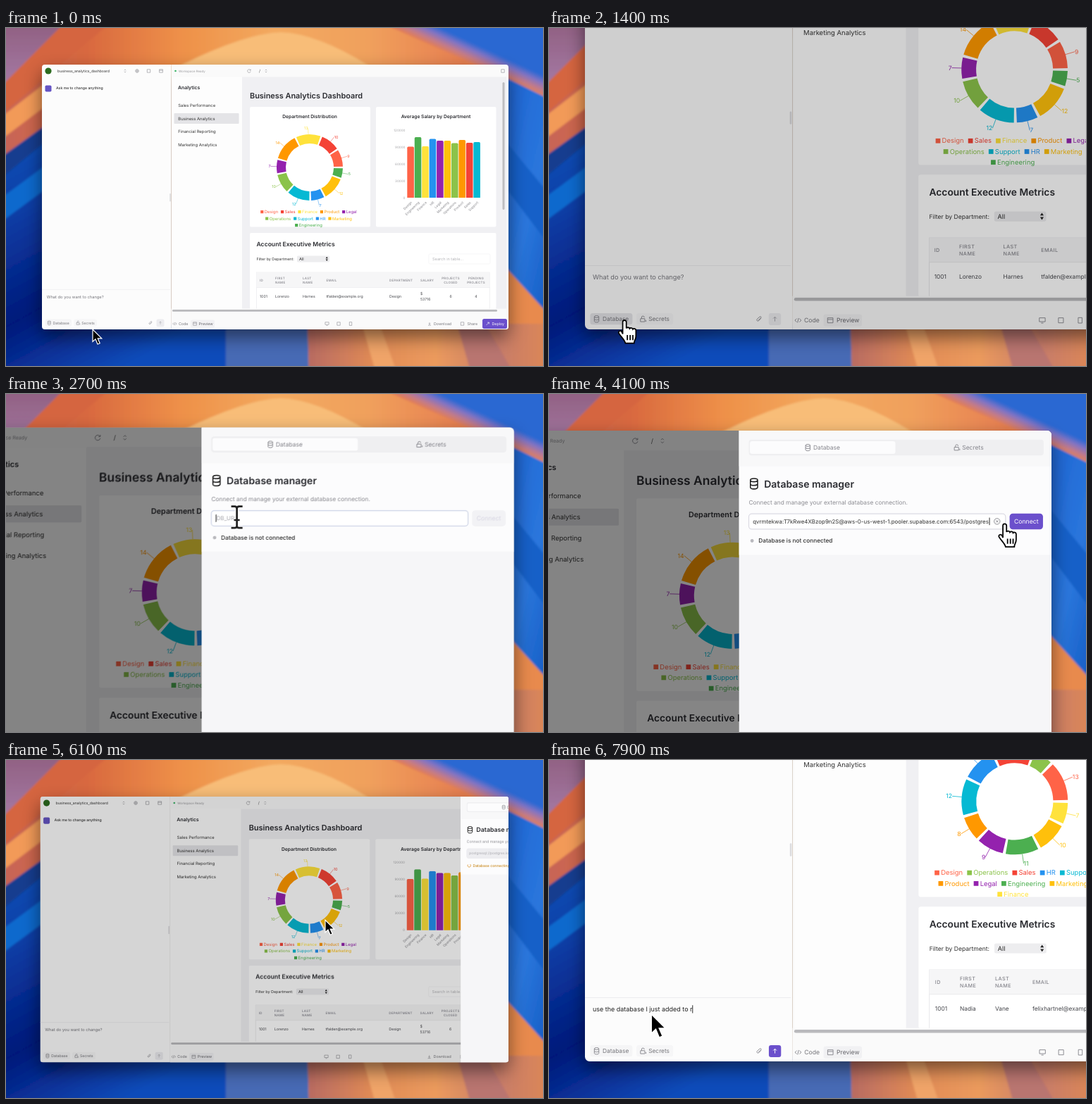
An HTML page for the animation above (8 s loop, 762 by 480 pixels).

```html
<!DOCTYPE html>
<html lang="en">
<head>
<meta charset="utf-8">
<title>Database setup</title>
<style>
html, body { margin: 0; width: 100%; height: 100%; overflow: hidden; }
svg { display: block; width: 762px; height: 480px; font-family: Inter, Roboto, sans-serif; text-rendering: geometricPrecision; }
.icon { fill: none; stroke: #8a8a90; stroke-width: .6; }
</style>
</head>
<body>
<svg id="stage" viewBox="0 0 762 480"></svg>
<script>
const LOOP = 8000, WIN = { x: 51, y: 52, w: 662, h: 376 };
const PURPLE = '#6b50cc', GREY = '#85858c', INK = '#2b2c31';
const color = {
  Design: '#ff6347', Sales: '#f44336', Finance: '#ffe23b', Product: '#ff9800', Legal: '#9422ae',
  Operations: '#8bc34a', Support: '#06b9d3', HR: '#2492f0', Marketing: '#ffc00b', Engineering: '#4caf50'
};

const rect = (x, y, w, h, fill, more = '') => `<rect x="${x}" y="${y}" width="${w}" height="${h}" fill="${fill}" ${more}/>`;
const text = (x, y, s, size, fill = INK, more = '') =>
  `<text x="${x}" y="${y + size * .36}" font-size="${size}" fill="${fill}" ${more}>${s}</text>`;
const poly = (points, fill) => `<polygon points="${points}" fill="${fill}"/>`;
const icon = (x, y, d, more = '', scale = 1) =>
  `<path class="icon" transform="translate(${x} ${y}) scale(${scale})" d="${d}" ${more}/>`;
const gradient = (id, dir, ...stops) => `<linearGradient id="${id}" ${dir}>${stops.map((c, i) =>
  `<stop offset="${i / (stops.length - 1)}" stop-color="${c}"/>`).join('')}</linearGradient>`;
const BOLD = 'font-weight="600"', MID = 'text-anchor="middle"', END = 'text-anchor="end"';
const DOWN = 'x1="0" y1="0" x2="0" y2="1"';

const shape = {
  db: 'M-2-2a2 .9 0 0 0 4 0a2 .9 0 0 0-4 0V2a2 .9 0 0 0 4 0V-2M-2 0a2 .9 0 0 0 4 0',
  key: 'M-2.2-.3H1.6V2.4H-2.2ZM-1.2-.3V-1.4a1.2 1.2 0 0 1 2.4 0M2.6 1V2.4',
  square: 'M-2.2-2.2H2.2V2.2H-2.2Z',
  page: 'M-1.7-2.4H1.7V2.4H-1.7Z',
  browser: 'M-2.4-2.2H2.4V2.2H-2.4ZM-2.4-.8H2.4',
  screen: 'M-2.6-2.2H2.6V1.2H-2.6ZM-1 2.4H1',
  code: 'M-1.2-1.5L-2.8 0L-1.2 1.5M1.2-1.5L2.8 0L1.2 1.5M.4-2L-.4 2',
  sort: 'M-1.2-.8L0-2L1.2-.8M-1.2.8L0 2L1.2.8',
  globe: 'M-2.3 0a2.3 2.3 0 0 0 4.6 0a2.3 2.3 0 0 0-4.6 0H2.3M0-2.3V2.3',
  reload: 'M2 -1a2.3 2.3 0 1 0 .2 1.6M2.2-2.4V-.9H.7',
  clip: 'M1.8-.6L-.4 1.6a1 1 0 0 1-1.4-1.4L.6-2a.7.7 0 0 1 1 1L-.6 1.2',
  up: 'M0 2V-2M-1.5-.5L0-2L1.5-.5',
  down: 'M0-2V1M-1.2-.2L0 1L1.2-.2M-2 2.2H2',
  arrow: 'M0 0V17.5L4 13.8L7 21L10.2 19.7L7.2 12.8H12.8Z',
  hand: 'M-1.6 12V1.5a1.6 1.6 0 0 1 3.2 0V7c.3-1 2.7-1 3 .3 .6-.9 2.6-.7 2.8.5 .7-.8 2.7-.5 2.7 1V14c0 3-1.6 3.6-1.6 6.2H.8C0 17-3.2 14.5-5 11.5c-1-1.7 1.6-3 2.5-1.5z',
  beam: 'M-5-9.5H-2Q0-9.5 0-7.5Q0-9.5 2-9.5H5M0-7.5V7.5M-5 9.5H-2Q0 9.5 0 7.5Q0 9.5 2 9.5H5M-2.5 2.5H2.5'
};

const wallpaper = `
  ${gradient('sky', 'x1="0" x2="1"', '#c4645a', '#d8683f', '#ee9048', '#f3a95f', '#f0a05c', '#e67f50', '#e98a4e')}
  ${gradient('mauve', DOWN, '#8f5f80', '#a67aa6')}
  ${gradient('navy', 'x1="0" y1="0" x2=".5" y2="1"', '#0b55bd', '#0a3ca4', '#02197a', '#0e4cba')}
  ${gradient('azure', 'x1="0" y1="0" x2="1" y2="1"', '#1d62d2', '#2a76dc', '#0b50b8')}
  ${gradient('lilac', 'gradientUnits="userSpaceOnUse" x1="548" y1="0" x2="560" y2="-26"', '#e67f50', '#c07a8c', '#7f73c4', '#2a68d2')}
  ${gradient('dusk', 'x1="0" x2="1"', '#b76a62', '#e08a56', '#eb9a5c', '#c77c6a', '#e28a50')}
  <g filter="url(#haze)">
  ${rect(-20, -20, 802, 520, 'url(#sky)')}
  ${poly('-9,-9 85,-9 -9,85', 'url(#mauve)')}
  ${poly('-9,85 85,-9 150,-9 -9,125', '#d5653f')}
  ${poly('-9,128 60,75 60,108 -9,160', '#f29a58')}
  <path d="M215 70Q330 8 390 6Q450 8 540 70z" fill="#f8bd78"/>
  ${poly('548,0 536,-9 790,-9 790,107', 'url(#lilac)')}
  ${poly('700,66 790,110 790,438 700,330', 'url(#azure)')}
  ${poly('700,150 790,259 790,334 700,215', '#1260c8')}
  ${poly('700,330 790,429 790,490 700,490', '#e88a4e')}
  ${poly('-9,185 70,128 70,420 320,420 312,490 -9,490', 'url(#navy)')}
  ${poly('-9,185 60,136 60,158 -9,215', '#123c8f')}
  ${poly('-9,243 60,192 60,226 -9,277', '#1169cd')}
  ${poly('312,420 428,420 430,490 312,490', '#466bb5')}
  ${poly('428,420 790,420 790,490 430,490', 'url(#dusk)')}
  ${poly('505,420 530,420 555,490 525,490', '#f0a468')}
  ${poly('640,420 680,420 720,490 660,490', '#b9746f')}</g>`;

// ---- Preview page: charts and table, once per data set ----
const RING = { x: 431, y: 198, mid: 40.5, outer: 47 };
const polar = (r, deg) => {
  const a = deg * Math.PI / 180;
  return `${(RING.x + r * Math.cos(a)).toFixed(2)} ${(RING.y - r * Math.sin(a)).toFixed(2)}`;
};
const GAP = 3.2;
function slices(counts) {
  const sum = counts.reduce((a, b) => a + b);
  let at = GAP / 2;
  return counts.map(n => {
    const from = at, to = at + (360 - GAP * counts.length) * n / sum;
    at = to + GAP;
    return [from, to];
  });
}
const arc = (from, to) =>
  `M${polar(RING.mid, from)}A${RING.mid} ${RING.mid} 0 ${to - from > 180 ? 1 : 0} 0 ${polar(RING.mid, to)}`;

const pen = document.createElement('canvas').getContext('2d');
pen.font = '59px Inter, Roboto, sans-serif';
const widthOf = s => pen.measureText(s).width / 10;

function legend(names) {
  return [names.slice(0, 5), names.slice(5, 9), names.slice(9)].map((row, i) => {
    const y = 261 + i * 9.5;
    let x = 429.5 - (row.reduce((w, n) => w + widthOf(n) + 9.4, 0) - 3.8) / 2;
    return row.map(n => {
      const out = rect(x, y - 2, 4.2, 4.2, color[n]) + text(x + 5.6, y, n, 5.9, color[n]);
      x += widthOf(n) + 9.4;
      return out;
    }).join('');
  }).join('');
}

function pie({ names, counts }) {
  return slices(counts).map(([from, to], i) => {
    const c = color[names[i]], mid = (from + to) / 2;
    const [x, y] = polar(55.5, mid).split(' ').map(Number);
    return `<path class="slice" d="${arc(from, to)}" fill="none" stroke="${c}" stroke-width="13"/>
      <path d="M${polar(RING.outer, mid)}L${x} ${y}" stroke="${c}" stroke-width=".5"/>` +
      text(x, y, counts[i], 5.4, c, x < RING.x ? END : '');
  }).join('');
}

function bars(tops) {
  const scale = [0, 1, 2, 3, 4].map(i => text(566.5, 241 - 24 * i, i * 30000, 4.6, '#a5a5a8', END)).join('');
  return scale + Object.keys(color).sort().map((n, i) => {
    const x = 569.3 + 10.45 * i, y = tops[i];
    return `<path d="M${x} 241V${y + 1.7}q0-1.7 1.7-1.7h6.2q1.7 0 1.7 1.7V241z" fill="${color[n]}"/>` +
      text(0, 0, n, 4.6, '#85858a', `${END} transform="translate(${x + 6} 247) rotate(-45)"`);
  }).join('');
}

function table({ cols, row }) {
  const heads = ['ID', 'FIRST NAME', 'LAST NAME', 'EMAIL', 'DEPARTMENT', 'SALARY', 'PROJECTS CLOSED', 'PENDING PROJECTS'];
  const stack = (s, x, y, step, size, fill, more) => s.split(' ').map((w, k, all) =>
    text(x, y + (k - (all.length - 1) / 2) * step, w, size, fill, more)).join('');
  return heads.map((h, i) => {
    const more = i > 5 ? MID : '';
    return stack(h, cols[i], 358, 6, 4.5, GREY, more + ' font-weight="500" letter-spacing=".25"') +
      stack(row[i], cols[i], 381.3, 8, 5.2, '#45464b', more);
  }).join('');
}

const page = (id, data) => `<g id="${id}">${pie(data)}${legend(data.names)}${bars(data.tops)}${table(data)}</g>`;

const before = {
  names: Object.keys(color), counts: [9, 10, 13, 14, 7, 10, 12, 7, 12, 5],
  tops: [168.5, 155, 168, 157.5, 160, 160, 163.5, 159, 163, 162],
  cols: [360, 382, 421, 454.5, 544, 588, 631, 667],
  row: ['1001', 'Lorenzo', 'Harnes', 'tfalden@example.org', 'Design', '$ 53716', '6', '4']
};
const after = {
  names: ['Design', 'Operations', 'Sales', 'HR', 'Support', 'Product', 'Legal', 'Engineering', 'Marketing', 'Finance'],
  counts: [13, 6, 13, 11, 12, 8, 9, 11, 10, 7],
  tops: [170, 161, 165, 160.5, 164, 163, 162, 156, 160, 163],
  cols: [360.6, 382.5, 413.6, 446.6, 544, 588, 631, 667],
  row: ['1001', 'Nadia', 'Vane', 'felixhartnel@example.org', 'Design', '$ 71482', '5', '3']
};

const chat = `
  ${rect(51, 52, 183.5, 376, '#fcfcfc')}
  <circle cx="60" cy="61" r="4.6" fill="#2c6b1f"/>
  ${text(73, 61, 'business_analytics_dashboard', 5.15, '#333')}
  ${icon(169, 61, shape.sort)}${icon(186, 61, shape.globe)}${icon(202.5, 61, shape.square)}${icon(220, 61, shape.browser)}
  ${rect(55.5, 81.5, 9, 9, '#6554c4', 'rx="1.8"')}
  ${text(71, 85.5, 'Ask me to change anything', 5.15, '#333', 'font-weight="500"')}
  ${rect(51, 371.3, 182, .6, '#ececee')}
  ${text(57.8, 381.7, '', 5.75, '#77777d', 'id="prompt"')}
  <path id="caret" stroke="#222" stroke-width=".6"/>
  ${rect(55.6, 413.6, 37.4, 10.2, '#f3f3f5', 'rx="2.2" id="dbPill"')}
  ${rect(96.5, 413.6, 32.5, 10.2, '#f6f6f7', 'rx="2.2"')}
  ${icon(61.3, 418.8, shape.db)}${text(66.6, 418.8, 'Database', 5.2, '#77777c')}
  ${icon(102.3, 418.8, shape.key)}${text(107.2, 418.8, 'Secrets', 5.2, '#77777c')}
  ${icon(205, 418.8, shape.clip)}
  ${rect(213.6, 413.6, 10.8, 10.6, '#ececef', 'rx="2" id="send"')}${icon(219, 418.9, shape.up, 'id="sendUp"')}`;

const preview = `
  ${rect(234.5, 52, 478.5, 376, '#fafafa')}
  <circle cx="240.5" cy="61" r="1.3" fill="#3eb66a"/>${text(245, 61, 'Workspace Ready', 4.4, '#9a9a9e')}
  ${icon(345, 61, shape.reload)}${text(359, 61, '/', 5.6, '#555')}${icon(369, 61, shape.sort)}${icon(705, 61, shape.square)}
  ${rect(236, 69.5, 99, 330, '#fdfdfd')}${rect(335, 69.5, 375, 330, '#f0f0f3')}
  ${text(244, 84.5, 'Analytics', 6.9, INK, BOLD)}
  ${rect(238.5, 121, 92, 15, '#e4e4e7', 'rx="1"')}
  ${['Sales Performance', 'Business Analytics', 'Financial Reporting', 'Marketing Analytics']
    .map((s, i) => text(244.3, 110 + 18.5 * i, s, 5.9, '#333')).join('')}
  ${text(346, 96, 'Business Analytics Dashboard', 10.9, INK, BOLD)}
  ${rect(346, 112, 171, 170.5, '#fff', 'rx="2"')}${rect(525, 112, 170.5, 170.5, '#fff', 'rx="2"')}
  ${rect(346, 291, 349.5, 108, '#fff', 'rx="2"')}
  ${text(431, 126, 'Department Distribution', 6.7, INK, `${BOLD} ${MID}`)}
  ${text(610, 126, 'Average Salary by Department', 6.7, INK, `${BOLD} ${MID}`)}
  ${text(355.5, 306.5, 'Account Executive Metrics', 8.6, INK, BOLD)}
  ${text(355.5, 328, 'Filter by Department:', 5.35, '#333')}
  ${rect(413, 323.6, 46, 8.8, '#ededef', 'rx="1.5"')}${text(416, 328, 'All', 5.6, '#222')}
  <path d="M453.6 327.2l1.6-2.4 1.6 2.4zM453.6 328.6l1.6 2.4 1.6-2.4z" fill="#222"/>
  ${rect(600, 321, 87, 14, '#fff', 'rx="1.5" stroke="#f0f0f2" stroke-width=".6"')}${text(605, 328, 'Search in table...', 5.6, '#b4b4b8')}
  ${rect(355.5, 347, 331, 52, '#fff', 'stroke="#e6e6e9" stroke-width=".6"')}${rect(355.5, 347, 331, 21.6, '#f6f6f7')}
  ${rect(355.5, 368.4, 331, .5, '#e6e6e9')}
  ${page('before', before)}${page('after', after)}
  ${rect(704.5, 77, 3, 181, '#bdbdc0', 'rx="1.5"')}
  ${rect(234.5, 398.5, 478.5, 29.5, '#fafafa')}${rect(236, 400, 461, 2.8, '#b9b9bc', 'rx="1.4"')}
  ${rect(232.2, 235, 1.6, 11.5, '#dcdcdf', 'rx=".8"')}
  ${icon(239.5, 420, shape.code)}${text(244.9, 420, 'Code', 5.4, '#77777c')}
  ${rect(262, 414.6, 34, 10.8, '#f1f1f3', 'rx="2"')}${icon(268, 420, shape.browser)}${text(273.5, 420, 'Preview', 5.4, '#66666b')}
  ${icon(455.5, 420, shape.screen)}${icon(472, 420, shape.square)}${icon(489, 420, shape.page)}
  ${icon(601, 420, shape.down)}${text(607, 420, 'Download', 5.3, '#77777c')}
  ${icon(647.5, 420, shape.square)}${text(654.5, 420, 'Share', 5.3, '#77777c')}
  ${rect(676, 413, 35, 14, PURPLE, 'rx="2.5"')}
  ${icon(683.5, 420, 'M-2 2L2-2M-.5-1.8L2-2L1.8.5', 'style="stroke:#fff"')}${text(689.5, 420, 'Deploy', 5.3, '#fff')}`;

const panel = `<g id="panel">
  ${rect(436.8, 52, 276.2, 376, '#f6f6f8')}${rect(436.8, 52, 276.2, 110, '#fcfcfd')}${rect(436.8, 52, 276.2, 31.5, '#f8f8f9')}
  ${rect(445.4, 60, 260.7, 14, '#efeff1', 'rx="2.5"')}${rect(446.4, 61.4, 128.6, 11.2, '#fcfcfd', 'rx="2"')}
  ${icon(497.6, 67, shape.db)}${text(502.4, 67, 'Database', 5.3, GREY)}
  ${icon(629.3, 67, shape.key)}${text(634, 67, 'Secrets', 5.3, GREY)}
  ${icon(450, 99, shape.db, 'style="stroke:#222"', 1.6)}
  ${text(458.9, 99.1, 'Database manager', 8.75, INK, BOLD)}
  ${text(445.4, 115.4, 'Connect and manage your external database connection.', 5.2, '#8e8e94')}
  ${rect(445.4, 125.6, 227, 13.6, '#fff', 'rx="2.6" stroke-width=".8" id="field"')}
  <clipPath id="fieldClip">${rect(448.6, 126, 211, 13)}</clipPath>
  <g clip-path="url(#fieldClip)">${text(450, 132.3, '', 4.95, '#333', 'id="url"')}</g>
  <path id="urlCaret" stroke="#222" stroke-width=".6"/>
  ${icon(664.9, 132.3, 'M-2.6 0a2.6 2.6 0 0 0 5.2 0a2.6 2.6 0 0 0-5.2 0M-1-1L1 1M1-1L-1 1', 'id="clear"')}
  ${rect(676, 125.4, 29.5, 14, PURPLE, 'rx="2.8" id="connect"')}
  ${text(690.7, 132.3, 'Connect', 5.4, '#fff', MID + ' id="connectText"')}
  <circle id="dot" cx="448.3" cy="149.5" r="1.5" fill="#b9b9be"/>
  <path id="spinner" d="M0-2.2a2.2 2.2 0 1 1-2.2 2.2" fill="none" stroke="#e0a040" stroke-width=".8"/>
  ${text(454, 149.5, '', 5.15, '#333', 'id="status" font-weight="500"')}</g>`;

const stage = document.getElementById('stage');
const SHOTS = 6, SHUTTER = 20;
stage.innerHTML = `
  <defs>
    <filter id="soft" x="-20%" y="-20%" width="140%" height="150%"><feGaussianBlur stdDeviation="13"/></filter>
    <filter id="haze"><feGaussianBlur stdDeviation="1.6"/></filter>
    <clipPath id="frame">${rect(WIN.x, WIN.y, WIN.w, WIN.h, '#000', 'rx="4"')}</clipPath>
    <g id="world" clip-path="url(#frame)">${chat}${preview}
      ${rect(WIN.x, WIN.y, WIN.w, WIN.h, '#000', 'id="dim"')}${panel}</g>
  </defs>
  ${wallpaper}
  <rect id="shadow" fill="#000" fill-opacity=".5" filter="url(#soft)"/>
  ${Array.from({ length: SHOTS }, (_, i) => `<use class="shot" href="#world" opacity="${1 / (i + 1)}"/>`).join('')}
  <g id="cursor">
    <path id="arrow" d="${shape.arrow}" fill="#000" stroke="#fff" stroke-width="1.2"/>
    <path id="hand" d="${shape.hand}M2.5 13V17.5M5 13V17.5M7.4 13V17.5" fill="#fff" stroke="#000" stroke-width="1.1"/>
    <g id="beam" fill="none"><path d="${shape.beam}" stroke="#fff" stroke-width="3.4"/><path d="${shape.beam}" stroke="#222" stroke-width="1.7"/></g>
  </g>`;

const $ = id => document.getElementById(id);
const set = (el, attrs) => { for (const k in attrs) el.setAttribute(k, attrs[k]); };
const show = (el, on) => el.style.display = on ? '' : 'none';
const clamp = v => Math.min(1, Math.max(0, v));
const ramp = (t, from, to) => clamp((t - from) / (to - from));
const ease = p => p * p * (3 - 2 * p);
const easeOut = p => 1 - (1 - p) ** 2.4;
const mix = (a, b, p) => a + (b - a) * p;

// ---- Camera: critically damped moves between anchored views ----
const STIFF = .009;
const view = (s, ax, ay) => [s, ax * (1 - s), ay * (1 - s)];
const home = view(1, 0, 0), chatView = view(1.605, 51, 428), panelView = view(1.605, 713, 52);
const moves = [[400, chatView], [2050, panelView], [5300, home], [6687, chatView]];
function camera(t) {
  return moves.reduce((cam, [start, goal]) => {
    const k = Math.max(0, t - start) * STIFF, p = 1 - (1 + k) * Math.exp(-k);
    return cam.map((v, i) => mix(v, goal[i], p));
  }, home);
}
const matrix = ([s, x, y]) => `translate(${x.toFixed(3)} ${y.toFixed(3)}) scale(${s.toFixed(5)})`;

const path = [
  [0, 123, 428], [700, 86, 420], [1650, 86, 420], [2450, 468, 131.4], [3600, 468, 131.4],
  [4222, 694, 135], [4400, 694, 131], [5600, 694, 131], [6700, 140, 351.6], [6850, 140, 351.6],
  [7300, 109.6, 386], [LOOP, 109.6, 386]
];
function pointer(t) {
  const i = Math.max(1, path.findIndex(p => p[0] > t));
  const [t0, x0, y0] = path[i - 1], [t1, x1, y1] = path[i], p = ease(ramp(t, t0, t1));
  return [mix(x0, x1, p), mix(y0, y1, p)];
}
function pointerKind(t) {
  if (t > 500 && t < 1750 || t > 4060 && t < 5750) return 'hand';
  if (t > 2300 && t < 4060 || t > 6600 && t < 7050) return 'beam';
  return 'arrow';
}

const URL_HEAD = 'postgresql://postgres.kwmnbqvrmtekwa:T7kRwe4XBzop9n2S@aws-0-us-west-1.poo';
const URL_TAIL = 'qvrmtekwa:T7kRwe4XBzop9n2S@aws-0-us-west-1.pooler.supabase.com:6543/postgres';
const PROMPT = 'use the database I just added to r';
const newSlices = slices(after.counts), newPaths = $('after').querySelectorAll('.slice');
const shots = document.querySelectorAll('.shot');

function drawPanel(t) {
  const connecting = t >= 4500, pasted = t >= 3300 && !connecting;
  const open = easeOut(ramp(t, 1400, 1800)) * (1 - ease(ramp(t, 5900, 6200)));
  set($('panel'), { transform: `translate(${(1 - open) * 280} 0)` });
  set($('dim'), { opacity: .48 * ramp(t, 1290, 1585) * (1 - ramp(t, 5900, 6200)) });
  set($('field'), { fill: connecting ? '#ededf0' : '#fff', stroke: connecting ? '#ededf0' : pasted ? '#dcdbe4' : '#d3d9ea' });
  $('url').textContent = connecting ? URL_HEAD : pasted ? URL_TAIL : 'DB_URL';
  set($('url'), {
    x: pasted ? 657.5 : connecting ? 448.8 : 450, 'text-anchor': pasted ? 'end' : 'start', fill: pasted ? '#333' : '#aaaab0'
  });
  show($('urlCaret'), t > 2400 && !connecting);
  set($('urlCaret'), { d: `M${pasted ? 658.2 : 449.6} 129v6.6` });
  show($('clear'), pasted);
  set($('connect'), { fill: pasted ? PURPLE : '#f2f2f5' });
  set($('connectText'), { fill: pasted ? '#fff' : connecting ? '#aaaab2' : '#dbd9e6' });
  show($('dot'), !connecting);
  show($('spinner'), connecting);
  set($('spinner'), { transform: `translate(448.8 149.5) rotate(${t * .36})` });
  $('status').textContent = connecting ? 'Database connecting...' : 'Database is not connected';
  set($('status'), { fill: connecting ? '#c98a20' : '#333' });
}

function drawChat(t) {
  const focused = t > 6500, typed = PROMPT.slice(0, Math.max(0, Math.floor((t - 7050) / 25) + 1));
  $('prompt').textContent = typed || 'What do you want to change?';
  set($('prompt'), { fill: typed ? '#222' : '#77777d', 'font-size': typed ? 5.6 : 5.75 });
  show($('caret'), focused);
  const x = 57.9 + (typed ? widthOf(typed) * 5.6 / 5.9 : -.2);
  set($('caret'), { d: `M${x} 378.3v7` });
  set($('dbPill'), { fill: t > 500 && t < 1750 ? '#e4e4e8' : '#f5f5f6' });
  set($('send'), { fill: typed ? PURPLE : '#ececef' });
  $('sendUp').style.stroke = typed ? '#fff' : '#a5a5aa';
}

function drawPage(t) {
  const reloaded = t >= 6350, sweep = easeOut(ramp(t, 6810, 7700));
  show($('before'), !reloaded);
  show($('after'), reloaded);
  newPaths.forEach((el, i) => {
    show(el, sweep > 0);
    set(el, { d: arc(newSlices[i][0] * sweep, newSlices[i][1] * sweep) });
  });
}

function draw(t) {
  drawPanel(t);
  drawChat(t);
  drawPage(t);
  const cam = camera(t), [s, tx, ty] = cam, past = camera(t - SHUTTER);
  const moving = Math.abs(s - past[0]) * 400 + Math.abs(tx - past[1]) > .6;
  shots.forEach((el, i) => {
    show(el, !i || moving);
    set(el, { transform: matrix(moving ? camera(t + SHUTTER * (.5 - i / (SHOTS - 1))) : cam) });
  });
  set($('shadow'), { x: tx + s * WIN.x, y: ty + s * WIN.y + 11, width: s * WIN.w, height: s * WIN.h, rx: 6 });
  const [px, py] = pointer(t), kind = pointerKind(t);
  set($('cursor'), { transform: `${matrix(cam)} translate(${px} ${py})` });
  for (const k of ['arrow', 'hand', 'beam']) show($(k), k === kind);
}

const began = performance.now();
function tick() {
  draw((performance.now() - began) % LOOP);
  requestAnimationFrame(tick);
}
draw(0);
requestAnimationFrame(tick);
</script>
</body>
</html>
```
